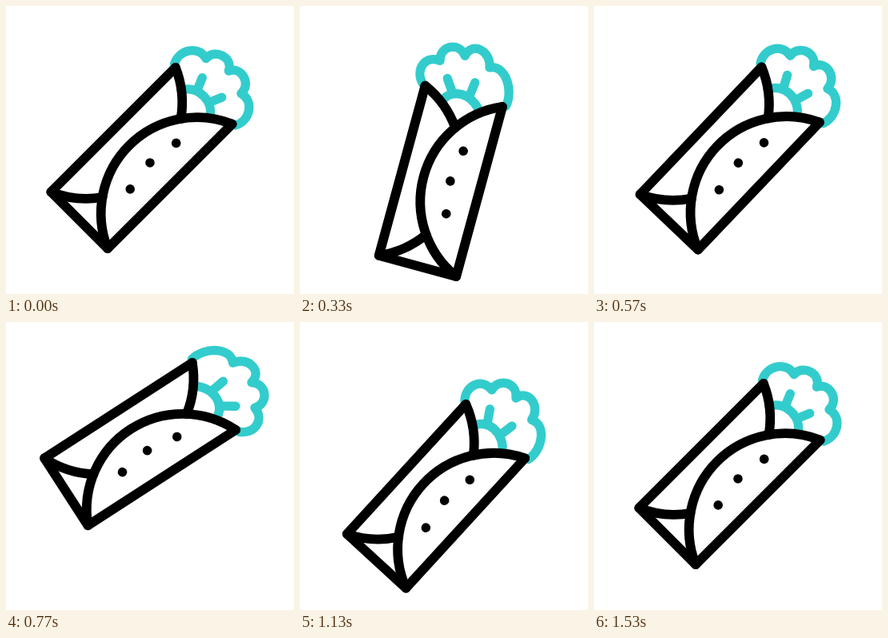
These frames come from a looping animation (360x360 px, 2000 ms). An HTML page:

```html
<!DOCTYPE html>
<html lang="en">
<head>
<meta charset="utf-8">
<title>Jumping wrap</title>
<style>
  html, body { margin: 0; width: 100%; height: 100%; overflow: hidden; background: #fff; }
  svg { display: block; width: 100vw; height: 100vh; }
  path { fill: none; stroke-linecap: round; stroke-linejoin: round; }
</style>
</head>
<body>
<svg viewBox="0 0 360 360">
  <g id="wrap">
    <g transform="translate(169.5 190) rotate(45)">
      <path id="leaf" stroke="#33cccc" stroke-width="11.3"/>
      <g stroke="#000" stroke-width="11.8">
        <path d="M-50-110V110H50V-110"/>
        <path d="M50-110A120 120 0 0 0 50 110"/>
        <path d="M-50-110A120 120 0 0 1 0-69.3M-50 110A120 120 0 0 0 0 69.3"/>
      </g>
      <circle cx="17.4" cy="-43.7" r="5.8"/>
      <circle cx="11.6" cy="-3.2" r="5.8"/>
      <circle cx="17.4" cy="37.6" r="5.8"/>
    </g>
  </g>
</svg>
<script>
const LOOP = 2000, FPS = 30;
const wrap = document.getElementById('wrap');
const leaf = document.getElementById('leaf');

// The leaf is symmetric: only its left half is given
const mirror = half => half.map(([x, y]) => [-x, y]).reverse();
const side = [[-54, -112], [-63, -128], [-50, -150], [-31, -145], [-32, -162], [-8, -170]];
const lobes = [...side, [0, -154], ...mirror(side)];
const arcHalf = [[-25, -95], [-15, -114.5]];
const arc = [...arcHalf, ...mirror(arcHalf)];
const vein = [[-10.5, -108.5], [-17.3, -124.5]];

// Keys are [frame, value] pairs
const lift = [[0, 0], [12, 27], [23, -35], [33, 27.7], [46, 0]];
const turn = [[0, 0], [9, -30.5], [22, 13], [30, -7.5], [39, 4.5], [46, 0]];
const bend = [[0, 0], [12, -1.05], [24, 0.95], [29, -1.3], [41, 0.15], [46, 0]];

const smooth = p => p * p * (3 - 2 * p);

function track(keys, n) {
  const i = keys.findIndex(k => k[0] > n);
  if (i < 0) return keys[keys.length - 1][1];
  const [n0, v0] = keys[i - 1], [n1, v1] = keys[i];
  return v0 + (v1 - v0) * smooth((n - n0) / (n1 - n0));
}

// Sways points sideways and tilts them, more the higher they are above the root
function sway(points, root, b) {
  return points.map(([x, y]) => {
    const h = root - y;
    const dx = 0.29 * b * h;
    const dy = (0.16 * b * x - 5 * Math.abs(b)) * h / 40;
    return (x + dx).toFixed(2) + ' ' + (y + dy).toFixed(2);
  });
}

const curve = ([first, ...rest]) => `M${first}C${rest.join(' ')}`;

function leafPath(b) {
  const veins = [vein, mirror(vein)].map(v => 'M' + sway(v, -95, b).join('L'));
  return curve(sway(lobes, -112, b)) + curve(sway(arc, -95, b)) + veins.join('');
}

function draw(ms) {
  const n = Math.floor((ms % LOOP + 3.4) * FPS / 1000) % (LOOP * FPS / 1000);
  wrap.setAttribute('transform',
    `translate(0 ${track(lift, n)}) rotate(${track(turn, n)} 180 180)`);
  leaf.setAttribute('d', leafPath(track(bend, n)));
}

const start = performance.now();
function tick() {
  draw(performance.now() - start);
  requestAnimationFrame(tick);
}
tick();
</script>
</body>
</html>
```
